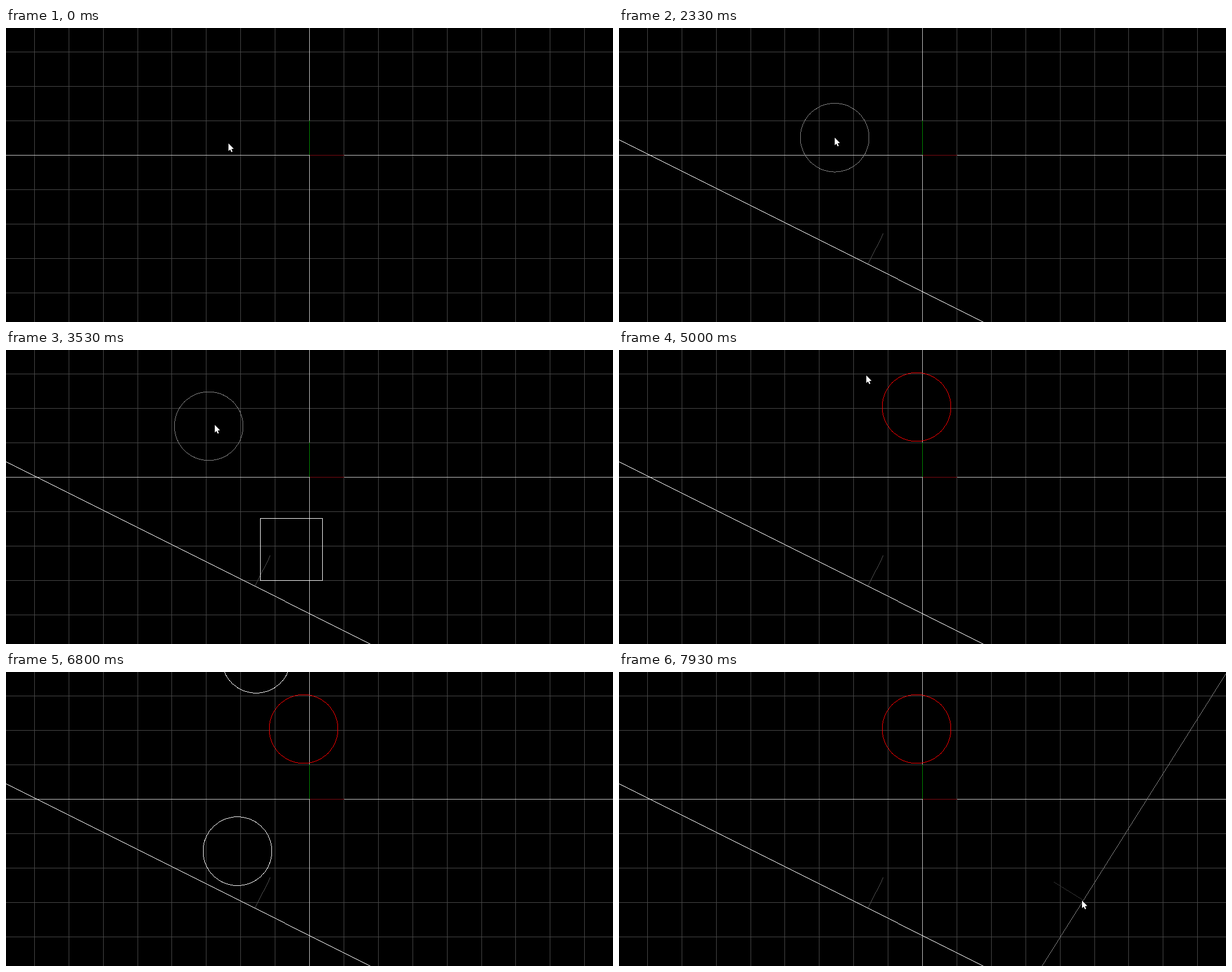
An HTML page with a canvas for the animation above (8 s loop, 1075 by 521 pixels).

```html
<!DOCTYPE html>
<html lang="en">
<head>
<meta charset="utf-8">
<title>Planes and circles</title>
<style>
html, body { margin: 0; width: 100%; height: 100%; overflow: hidden; background: #000; }
canvas { display: block; }
</style>
</head>
<body>
<canvas id="stage" width="1075" height="521"></canvas>
<script>
const W = 1075, H = 521, LOOP = 8000, STEP = 1000 / 15;
const UNIT = 60.9, HALF = 55, ORIGIN = [537.5, 225.5];
const GRAVITY = 3500;   // px per second squared
const LAG = 40;         // previews trail the pointer by this many ms
const WHITE = '#fff', GREY = '#868686', GRID = '#484848';
const FLOOR = [440.7, 418.7], PEG = [527, 101];
const FLOOR_AT = 1860, PEG_AT = 4190;

const ctx = document.getElementById('stage').getContext('2d');

// Vector from a to b as unit direction and length
function toward([ax, ay], [bx, by]) {
  const dx = bx - ax, dy = by - ay, d = Math.hypot(dx, dy) || 1;
  return [dx / d, dy / d, d];
}

// Pointer: a sweep round an ellipse, then eased moves (start, end, x, y)
const moves = [
  [800, 1060, 356, 205], [1090, 1250, 358, 229], [1250, 1700, ...FLOOR],
  [1960, 2280, 382, 194.2], [2400, 2615, 360, 200], [2700, 2880, 343, 170],
  [2890, 3080, 435, 152], [3130, 3460, 357.2, 135.3], [3470, 3850, ...PEG],
  [4610, 5000, 438, 45], [5000, 5150, 430, -20], [5200, 6900, 560, -20],
  [7150, 7600, 850, 402], [7620, 7960, 819.5, 405]
];
const clamp = u => Math.min(1, Math.max(0, u));
const ease = u => u * u * (3 - 2 * u);

function pointer(t) {
  const turn = 1.5 * Math.PI * clamp((t - 10) / 790);
  let x = 343.5 + 50.5 * Math.cos(turn), y = 204.5 - 55.5 * Math.sin(turn);
  for (const [from, to, mx, my] of moves) {
    const u = ease(clamp((t - from) / (to - from)));
    x += (mx - x) * u;
    y += (my - y) * u;
  }
  return [x, y];
}

// Falling bodies, dropped at rest
const bodies = [
  { born: 2600, x: 360, y: 200 },
  { born: 3091, x: 435, y: 152, square: true },
  { born: 5323, x: 387, y: -40 },
  { born: 6121, x: 443, y: -50 },
  { born: 6677, x: 443, y: -50 }
];
const [UPX, UPY] = toward(FLOOR, ORIGIN);

// Where a body is at time t, or null when it is not on the stage
function fall({ born, x, y, square }, t) {
  if (t < born) return null;
  const reach = square ? HALF * (Math.abs(UPX) + Math.abs(UPY)) : UNIT;
  const bounce = square ? 0.3 : 0.245;
  const dt = 0.0005;
  let vx = 0, vy = 0;

  // Push out along the normal and reflect
  const hit = (nx, ny, depth, spring) => {
    if (depth <= 0) return;
    x += nx * depth;
    y += ny * depth;
    const v = vx * nx + vy * ny;
    if (v >= 0) return;
    vx -= (1 + spring) * v * nx;
    vy -= (1 + spring) * v * ny;
  };

  for (let n = Math.round((t - born) / 1000 / dt); n > 0; n--) {
    x += vx * dt;
    y += vy * dt + GRAVITY * dt * dt / 2;
    vy += GRAVITY * dt;
    hit(UPX, UPY, reach - (x - FLOOR[0]) * UPX - (y - FLOOR[1]) * UPY, bounce);
    if (born > PEG_AT) {
      const [nx, ny, d] = toward(PEG, [x, y]);
      hit(nx, ny, 2 * UNIT - d, 0);
    }
    if (y > H + UNIT) return null;
  }
  return [x, y];
}

// Hard-edged one pixel line
function line(x0, y0, x1, y1, color) {
  ctx.fillStyle = color;
  const dx = x1 - x0, dy = y1 - y0;
  const n = Math.max(1, Math.ceil(Math.max(Math.abs(dx), Math.abs(dy))));
  for (let i = 0; i <= n; i++) {
    const x = Math.floor(x0 + dx * i / n), y = Math.floor(y0 + dy * i / n);
    if (x >= 0 && y >= 0 && x < W && y < H) ctx.fillRect(x, y, 1, 1);
  }
}

function polygon(points, color) {
  points.forEach((p, i) => line(...p, ...points[(i + 1) % points.length], color));
}

function circle([x, y], color) {
  const sides = 64;
  polygon(Array.from({ length: sides }, (_, i) => {
    const a = i * 2 * Math.PI / sides;
    return [x + UNIT * Math.cos(a), y + UNIT * Math.sin(a)];
  }), color);
}

function box([x, y], color) {
  const l = x - HALF, r = x + HALF, t = y - HALF, b = y + HALF;
  polygon([[l, t], [r, t], [r, b], [l, b]], color);
}

// Plane through a point, facing the origin
function plane([x, y], color, normalColor) {
  const [nx, ny] = toward([x, y], ORIGIN), far = 1300;
  line(x, y, x + nx * UNIT, y + ny * UNIT, normalColor);
  line(x + ny * far, y - nx * far, x - ny * far, y + nx * far, color);
}

function rect(color, ...area) {
  ctx.fillStyle = color;
  ctx.fillRect(...area);
}

function grid() {
  const [ox, oy] = ORIGIN;
  for (let k = -8; k <= 8; k++) {
    rect(GRID, Math.floor(ox + k * UNIT), 0, 1, H);
    rect(GRID, 0, Math.floor(oy + k * UNIT), W, 1);
  }
  rect('#c8c8c8', 537, 0, 1, H);
  rect('#c8c8c8', 0, 225, W, 1);
  rect('#7f0a12', 538, 225, 61, 1);
  rect('#008a00', 537, 164, 1, 61);
}

function arrow([x, y]) {
  const shape = [[0, 0], [0, 13.5], [3, 10.8], [5.2, 15.5], [7.2, 14.6], [5.2, 10], [9.3, 9.6]];
  ctx.beginPath();
  for (const [px, py] of shape) ctx.lineTo(x + px, y + py);
  ctx.closePath();
  ctx.strokeStyle = '#000';
  ctx.lineWidth = 1.5;
  ctx.stroke();
  ctx.fillStyle = WHITE;
  ctx.fill();
}

function draw(t) {
  const within = (a, b) => t >= a && t < b;
  const aim = pointer(t - LAG);

  rect('#000', 0, 0, W, H);
  grid();

  if (t >= FLOOR_AT) plane(FLOOR, WHITE, '#505050');
  if (t >= PEG_AT) circle(PEG, t >= 4525 ? '#f00' : WHITE);
  for (const body of bodies) {
    const place = fall(body, t);
    if (place) (body.square ? box : circle)(place, WHITE);
  }

  if (within(925, FLOOR_AT) || t >= 7660) plane(aim, GREY, '#333');
  if (within(1990, PEG_AT)) circle(aim, GREY);
  arrow(pointer(t));
}

let start, shown = -1;
function tick(now) {
  if (start === undefined) start = now;
  const frame = Math.floor(((now - start) % LOOP + 4) / STEP) % 120;
  if (frame !== shown) draw(frame * STEP);
  shown = frame;
  requestAnimationFrame(tick);
}
draw(0);
requestAnimationFrame(tick);
</script>
</body>
</html>
```
